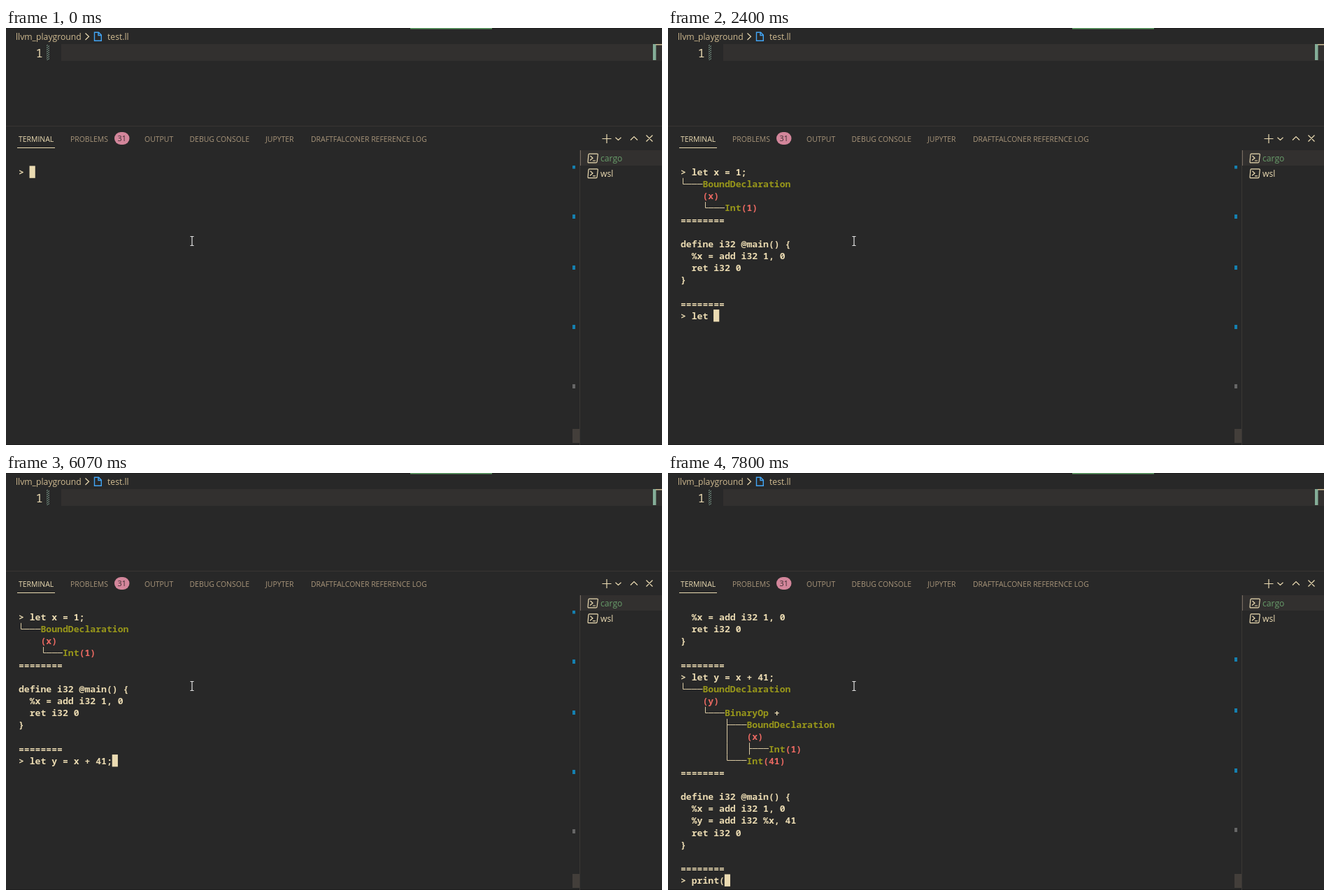
These frames come from a looping animation (938x597 px, 8 s). An HTML page:

```html
<!DOCTYPE html>
<html lang="en">
<head>
<meta charset="utf-8">
<title>Terminal session</title>
<style>
  html, body { margin: 0; width: 100%; height: 100%; overflow: hidden; background: #282828; }
  svg { display: block; width: 938px; height: 597px; }
  text { white-space: pre; font-family: "Open Sans", "Noto Sans", sans-serif; }
  .crumb { font-size: 12.2px; fill: #d0bb91; }
  .tab { font-size: 10.45px; fill: #a8957a; }
  .line { fill: none; stroke: #ebdbb2; stroke-width: 1.2; }
  .mono, #term text { font-family: "Noto Sans Mono", "DejaVu Sans Mono", monospace; fill: #ebdbb2; }
  #term text { font-size: 13.13px; font-weight: 600; }
  #term .node { fill: #98971a; }
  #term .value { fill: #ea6962; }
</style>
</head>
<body>
<svg viewBox="0 0 938 597">
  <defs>
    <pattern id="hatch" width="4" height="3" patternUnits="userSpaceOnUse">
      <path d="M-1 4L5 -1M-1 1L1 -1M3 4L5 2" stroke="#8fb3a0" stroke-width="1"/>
    </pattern>
    <g id="shell" class="line">
      <path d="M2.5 .6H13.6Q15 .6 14.8 2L13.6 12Q13.4 13.4 12 13.4H1.6Q.4 13.4 .6 12L1.4 2Q1.6 .6 2.5 .6Z"/>
      <path d="M4 3.5L7.5 6.7L3.5 10M7.5 10.5H11.5"/>
    </g>
  </defs>

  <!-- editor -->
  <path d="M0 0H938V1H0ZM0 596H938V597H0Z" fill="#1e1e1e"/>
  <path d="M578 0H695V1.4H578Z" fill="#5f9e65"/>
  <text class="crumb" x="14" y="17">llvm_playground</text>
  <path class="line" d="M113.5 7.5L118.5 12.3L113.5 17"/>
  <path d="M126.5 6.2H132.5L136.3 10V18.3H126.5ZM132 6.5V10.5H136" fill="none" stroke="#42a5f5" stroke-width="1.4"/>
  <text class="crumb" x="145" y="17">test.ll</text>
  <path d="M79 23H938V47H79Z" fill="#32302f"/>
  <text class="mono" x="42.5" y="41.5" font-size="17">1</text>
  <path d="M58 24H62V46H58Z" fill="url(#hatch)"/>
  <path d="M925 23H929.5V46H925Z" fill="#84ad98"/>
  <path d="M929 23H938V24.5H929Z" fill="#cdbd94"/>

  <!-- panel header -->
  <path d="M0 140H938V141H0Z" fill="#383533"/>
  <text class="tab" x="18" y="163" style="fill:#ebdbb2">TERMINAL</text>
  <path d="M16 171H70V172H16Z" fill="#ebdbb2"/>
  <text class="tab" x="92" y="163">PROBLEMS</text>
  <rect x="155" y="149" width="21.5" height="18" rx="9" fill="#d3869b"/>
  <text x="165.7" y="162.3" font-size="10.8" text-anchor="middle" fill="#3a2c30">31</text>
  <text class="tab" x="198" y="163">OUTPUT</text>
  <text class="tab" x="262.5" y="163">DEBUG CONSOLE</text>
  <text class="tab" x="371" y="163">JUPYTER</text>
  <text class="tab" x="436" y="163">DRAFTFALCONER REFERENCE LOG</text>
  <path class="line" d="M852.5 158.5H865.5M859 152V165M871.5 156.7L875.5 160.5L879.5 156.7M893 160.5L898 155.5L903 160.5M915.5 153.5L924.5 162.5M924.5 153.5L915.5 162.5"/>

  <!-- terminal list -->
  <path d="M820.5 175V597" stroke="#3a3735"/>
  <path d="M822 175H938V197H822Z" fill="#32302f"/>
  <path d="M821.5 175V197" stroke="#766b61"/>
  <use href="#shell" x="831.5" y="179.5"/>
  <use href="#shell" x="831.5" y="201.3"/>
  <text class="crumb" x="850" y="191" style="fill:#689d6a">cargo</text>
  <text class="crumb" x="850" y="212.7" style="fill:#ebdbb2">wsl</text>
  <path d="M810 574H820V594H810Z" fill="#433e3a"/>

  <g id="term"></g>
  <path d="M263.5 298.5H265.2L266 299.3L266.8 298.5H268.5M266 299V311M263.5 311.5H265.2L266 310.7L266.8 311.5H268.5" fill="none" stroke="#eee" stroke-width="1.1"/>
</svg>

<script>
const LOOP = 8000, LEFT = 18, TOP = 197.6, CELL = 7.878, ROW = 17.14;
const term = document.getElementById("term");

const first = `> let x = 1;
└───BoundDeclaration
    (x)
    └───Int(1)
========

define i32 @main() {
  %x = add i32 1, 0
  ret i32 0
}

========`;

const second = `  %x = add i32 1, 0
  ret i32 0
}

========
> let y = x + 41;
└───BoundDeclaration
    (y)
    └───BinaryOp +
        ├───BoundDeclaration
        │   (x)
        │   ├───Int(1)
        └───Int(41)
========

define i32 @main() {
  %x = add i32 1, 0
  %y = add i32 %x, 41
  ret i32 0
}

========`;

// keys: [first keystroke, last keystroke, text]
const screens = [
  { at: 0, rows: [], marks: [197, 267, 340, 425, 510],
    keys: [[670, 1130, "let x ="], [1270, 1330, " 1"], [1530, 1530, ";"]] },
  { at: 1730, rows: first.split("\n"), marks: [197, 267, 340, 425, 510],
    keys: [[2130, 2400, "let "], [2930, 3200, "y = "], [4530, 4600, "x "],
           [4870, 4930, "+ "], [5530, 5530, "41"], [6070, 6070, ";"]] },
  { at: 6270, rows: second.split("\n"), marks: [264, 337, 423, 508],
    keys: [[6800, 7000, "pri"], [7200, 7270, "nt"], [7800, 7800, "("]] }
];

function typed(keys, t) {
  return keys.map(([from, to, text]) => {
    const gap = (to - from) / (text.length - 1 || 1);
    return [...text].filter((_, i) => t >= from + gap * i).join("");
  }).join("");
}

const snap = v => Math.floor(v) + 0.5;

function branches(row, n) {
  const top = TOP + n * ROW, mid = snap(top + ROW / 2);
  return [...row].map((c, i) => {
    const x = LEFT + i * CELL, cx = snap(x + CELL / 2);
    let d = "";
    if ("├│".includes(c)) d += `M${cx} ${top}V${top + ROW}`;
    if (c === "└") d += `M${cx} ${top}V${mid}`;
    if ("├└".includes(c)) d += `M${cx} ${mid}H${x + CELL}`;
    if (c === "─") d += `M${x} ${mid}H${x + CELL}`;
    return d;
  }).join("");
}

function drawRow(row, n) {
  const text = row.replace(/[├└│─]/g, " ")
    .replace(/BoundDeclaration|BinaryOp|Int|\(\w+\)/g, word =>
      `<tspan class="${word[0] === "(" ? "value" : "node"}">${word}</tspan>`);
  return `<text x="${LEFT}" y="${TOP + n * ROW + 13.4}">${text}</text>
    <path d="${branches(row, n)}" fill="none" stroke="#d9c9a2"/>`;
}

function drawMark(y, i, all) {
  const last = i === all.length - 1;
  return `<rect x="810" y="${y}" width="4" height="${y === 197 ? 4.5 : 6}" fill="${last ? "#666" : "#1480b0"}"/>`;
}

let shown = "";
function frame() {
  const t = performance.now() % LOOP;
  const { rows, marks, keys } = screens.findLast(s => t >= s.at);
  const prompt = "> " + typed(keys, t);
  const markup = marks.map(drawMark).join("") + [...rows, prompt].map(drawRow).join("") +
    `<rect x="${LEFT + prompt.length * CELL - 0.2}" y="${TOP + rows.length * ROW - 0.2}" width="8.2" height="17.4" fill="#ebdbb2"/>`;
  if (markup !== shown) term.innerHTML = shown = markup;
  requestAnimationFrame(frame);
}
frame();
</script>
</body>
</html>
```
